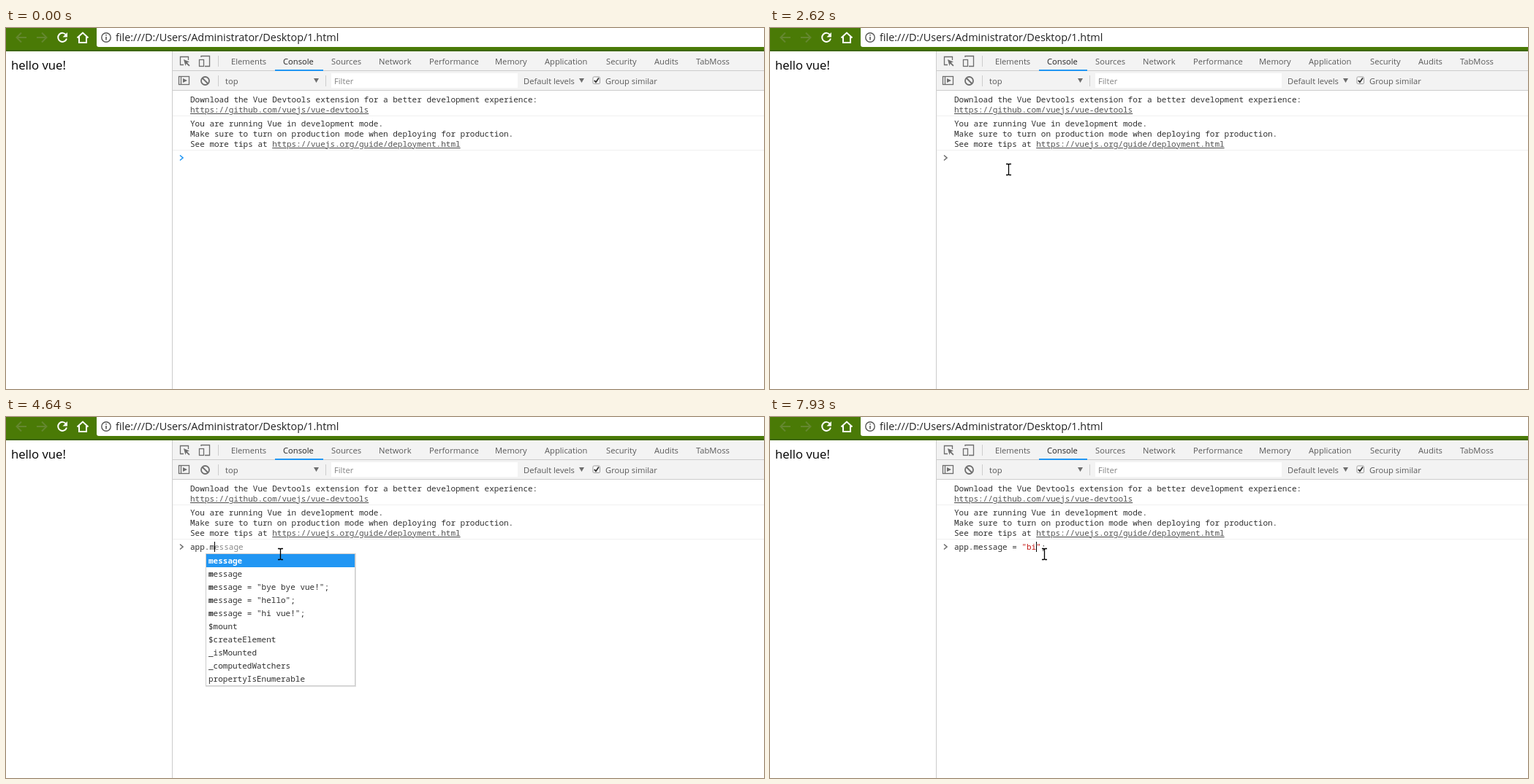
An HTML page that plays this animation: 1037 px wide and 495 px high, repeating every 8000 ms.

```html
<!DOCTYPE html>
<html lang="zh-CN">
<head>
<meta charset="utf-8">
<title>Console demo</title>
<style>
  html, body { margin: 0; width: 100%; height: 100%; overflow: hidden; background: #fff; }
  svg { display: block; }
  text { white-space: pre; }
  .ui { font: 11.2px "Open Sans", "Noto Sans", sans-serif; fill: #5a5a5a; }
  .mono { font: 11px "Noto Sans Mono", "DejaVu Sans Mono", monospace; fill: #303030; }
  .zh { font: 12px "Noto Sans CJK SC", "Noto Sans CJK", "Noto Sans", sans-serif; fill: #000; }
  .link { fill: #545454; text-decoration: underline; }
  .str { fill: #c41a16; }
  .hint { fill: #888; }
  .b { font-weight: bold; }
  .line { fill: none; stroke-width: 1; }
</style>
</head>
<body>
<svg id="stage" width="1037" height="495" viewBox="0 0 1037 495">
  <rect width="1037" height="495" fill="#fff"/>

  <!-- browser bar -->
  <rect width="1037" height="32" fill="#4a7a06"/>
  <rect y="30" width="1037" height="2" fill="#3d6604"/>
  <path d="M124 0H1037V26H127Q124 26 124 23Z" fill="#fff"/>
  <g fill="none" stroke="#64872f" stroke-width="2">
    <path d="M28 13H15M21 6.500L14.500 13L21 19.500"/>
    <path d="M42 13H55M49 6.500L55.500 13L49 19.500"/>
  </g>
  <g id="reload">
    <path d="M82.200 9.500A6 6 0 1 0 83 14.500" fill="none" stroke="#fff" stroke-width="2"/>
    <path d="M84 6V12.500H77.500Z" fill="#fff"/>
  </g>
  <path id="stop" d="M72 8L82 18M82 8L72 18" stroke="#fff" stroke-width="2"/>
  <path d="M97.500 13.500L105 6.500L112.500 13.500M100 12V20H110V12" fill="none" stroke="#fff" stroke-width="2"/>
  <circle cx="137" cy="13" r="6.200" fill="none" stroke="#555" stroke-width="1.400"/>
  <path d="M137 9V10.600M137 12V16.500" stroke="#555" stroke-width="1.600"/>
  <text x="150" y="18" font-size="14.430" font-family="Open Sans, Noto Sans, sans-serif" fill="#222">file:///D:/Users/Administrator/Desktop/1.html</text>
  <text x="7" y="57" font-size="16.700" font-family="Open Sans, Noto Sans, sans-serif">hello vue!</text>

  <!-- tool panel -->
  <rect x="228" y="32" width="809" height="54" fill="#f3f3f3"/>
  <path class="line" d="M227.500 32V495M228 58.500H1037M228 85.500H1037M290.500 38V53M290.500 65V80M437.500 65V80" stroke="#ccc"/>
  <rect x="368" y="57" width="66" height="2" fill="#2196f3"/>
  <g fill="none" stroke="#6e6e6e" stroke-width="1.300">
    <path d="M243 50.500H238.500V39.500H249.500V44"/>
    <path d="M267 40V38.500H278.500V52.500H272"/>
    <rect x="264.500" y="43.500" width="6" height="9"/>
    <rect x="236.500" y="66.500" width="14" height="11"/>
    <path d="M239.500 67V77"/>
    <circle cx="272.500" cy="72.500" r="5.500" stroke-width="1.800"/>
    <path d="M268.500 68.500L276.500 76.500" stroke-width="1.800"/>
  </g>
  <path d="M243 43L251 46.500L247.800 47.600L251.500 51.300L250.300 52.500L246.600 48.800L245.500 52ZM242 69L248 72L242 75Z" fill="#6e6e6e"/>
  <g id="tabs" class="ui"></g>
  <rect x="445" y="62" width="255" height="20" fill="#fff"/>
  <g class="ui">
    <text x="300" y="77">top</text>
    <text x="449" y="77" fill-opacity=".75">Filter</text>
    <text x="708" y="77">Default levels</text>
    <text x="820" y="77">Group similar</text>
  </g>
  <path d="M421 69H428L424.500 75ZM784 69H791L787.500 75Z" fill="#6e6e6e"/>
  <rect x="803" y="67" width="9.500" height="9.500" rx="1.500" fill="#fff" stroke="#999"/>
  <path d="M804.800 71.800L807 74.300L811 68.500" fill="none" stroke="#333" stroke-width="1.800"/>

  <!-- console -->
  <g id="log" class="mono">
    <path class="line" d="M228 120.500H1037M228 167.500H1037" stroke="#f0f0f0"/>
    <text x="252" y="102">Download the Vue Devtools extension for a better development experience:</text>
    <text x="252" y="116" class="link">https://github.com/vuejs/vue-devtools</text>
    <text x="252" y="135">You are running Vue in development mode.</text>
    <text x="252" y="149">Make sure to turn on production mode when deploying for production.</text>
    <text x="252" y="163">See more tips at <tspan class="link">https://vuejs.org/guide/deployment.html</tspan></text>
  </g>
  <path id="chevron" class="line" d="M238 174.500L242 178L238 181.500" style="stroke-width:1.600"/>
  <text id="input" class="mono" x="252" y="182"></text>
  <rect id="caret" y="171" width="1" height="14" fill="#000"/>
  <g id="popup" class="mono"></g>
  <g id="menu" class="zh"></g>

  <path id="arrow" d="M.5 .5V16.500L4.200 13L6.700 18.700L9 17.700L6.500 12.200H11.700Z" fill="#fff" stroke="#000"/>
  <path id="beam" class="line" d="M-3.500 -7.500H-1L0 -6.500L1 -7.500H3.500M0 -6.500V6.500M-3.500 7.500H-1L0 6.500L1 7.500H3.500" stroke="#000" style="stroke-width:1.300"/>
</svg>
<script>
const LOOP = 8000, CHAR = 6.6, TEXT_X = 252, ROW = 18;
const $ = id => document.getElementById(id);
const esc = s => s.replace(/&/g, '&amp;').replace(/</g, '&lt;');
const show = (id, on) => $(id).style.display = on ? '' : 'none';
const place = (id, x, y) => $(id).setAttribute('transform', `translate(${x} ${y})`);
const rect = (x, y, w, h, fill, more = '') =>
  `<rect x="${x}" y="${y}" width="${w}" height="${h}" fill="${fill}" ${more}/>`;
const label = (x, y, s, more = '') => `<text x="${x}" y="${y}" ${more}>${s}</text>`;

const tabs = { Elements: 308, Console: 379, Sources: 445, Network: 510, Performance: 579,
  Memory: 669, Application: 737, Security: 821, Audits: 887, TabMoss: 944 };
$('tabs').innerHTML = Object.entries(tabs).map(([name, x]) =>
  label(x, 50, name, name === 'Console' ? 'style="fill:#222"' : '')).join('');

// Context menu: [centre y, title, shortcut, disabled]
const menuRows = [
  [157, '返回(B)', 'Alt+向左箭头', true], [180, '前进(F)', 'Alt+向右箭头', true],
  [203, '重新加载(R)', 'Ctrl+R'], [237, '另存为(A)...', 'Ctrl+S'], [260, '打印(P)...', 'Ctrl+P'],
  [283, '投射(C)...', ''], [306, '翻成中文（简体）(T)', ''], [340, '保存网页', ''],
  [363, 'TabMoss', ''], [397, '查看网页源代码(V)', 'Ctrl+U'], [420, '检查(N)', 'Ctrl+Shift+I']];
$('menu').innerHTML =
  rect(145, 146, 267, 290, '#000', 'opacity=".18"') + rect(144, 145, 267, 290, '#000', 'opacity=".28"') +
  rect(141.5, 142.5, 267, 291, '#fff', 'stroke="#bababa"') +
  rect(142, 192, 266, 23, '#e9e9e9', 'id="hover"') +
  [219, 322, 379].map(y => rect(143, y, 265, 1, '#e6e6e6')).join('') +
  menuRows.map(([y, name, keys, off]) =>
    label(178, y + 5, name, off ? 'style="fill:#9b9b9b"' : '') +
    label(382.5, y + 4.5, keys, `text-anchor="end" letter-spacing=".4" style="fill:${off ? '#9b9b9b' : '#777'}"`)).join('') +
  rect(152, 332, 16, 16, '#3b8ee8', 'rx="3"') +
  '<circle cx="160" cy="363" r="8" fill="#b3220f"/><path d="M396 359.500L400.500 363.500L396 367.500Z" fill="#555"/>';

// Completion lists
const past = ['"bye bye vue!";', '"hello";', '"hi vue!";'];
const pastFrom = lead => past.map(s => lead + s);
const appNames = ['app', 'applicationCache', 'ApplicationCache', 'ApplicationCacheErrorEvent',
  'app.message', ...pastFrom('app.message = ')];
const messages = ['message', 'message', ...pastFrom('message = ')];
const lists = {
  a: { x: 248, w: 265, bar: true, sel: 'Window', query: 'a', rows: ['alert', 'app', 'applicationCache', 'atob',
    'AbortController', 'AbortSignal', 'AbsoluteOrientationSensor', 'Accelerometer', 'AnalyserNode',
    'AnimationEvent', 'ApplicationCache', 'ApplicationCacheErrorEvent', 'Array', 'ArrayBuffer',
    'Atomics', 'Attr', 'Audio'] },
  ap: { x: 248, w: 217, bar: true, sel: 'Window', query: 'ap', rows: [...appNames, 'captureEvents', 'escape',
    'unescape', 'DOMStringMap', 'ImageCapture', 'Map', 'MimeTypeArray', 'NamedNodeMap', 'WeakMap'] },
  app: { x: 248, w: 215, sel: 'Window', query: 'app', rows: appNames },
  dot: { x: 274, w: 189, bar: true, sel: ' ', query: '', rows: [...messages, '$attrs', '$children',
    '$createElement', '$el', '$listeners', '$options', '$parent', '$refs', '$root', '$scopedSlots',
    '$slots', '$vnode'] },
  m: { x: 274, w: 203, sel: ' ', query: 'm', rows: [...messages, '$mount', '$createElement', '_isMounted',
    '_computedWatchers', 'propertyIsEnumerable'] },
  me: { x: 274, w: 203, above: true, sel: ' ', query: 'me', rows: [...messages, '$createElement'] },
  set: { x: 327, w: 139, above: true, query: '', rows: pastFrom('= ') },
  val: { x: 340, w: 124, above: true, query: '', rows: past },
  quote: { x: 340, w: 124, above: true, query: '"', rows: past }
};

function popupHtml({ x, w, bar, above, sel, query, rows }) {
  const h = rows.length * ROW, top = above ? 168 - h : 188, inner = bar ? w - 17 : w;
  let out = rect(x - 1, top - 1, w + 3, h + 3, '#000', 'opacity=".12"') +
    rect(x - .5, top - .5, w + 1, h + 1, '#fff', 'stroke="#ccc"');
  if (sel) out += rect(x, top, inner, ROW, '#2196f3');
  rows.forEach((s, i) => {
    const y = top + i * ROW + 13;
    const n = s.toLowerCase().startsWith(query) ? query.length : 0;
    if (sel && !i) {
      out += label(x + 3, y, esc(s), 'class="b" fill="#fff" style="fill:#fff"') +
        label(x + inner - 4, y, sel, 'class="b" text-anchor="end" style="fill:#fff"');
    } else {
      out += label(x + 3, y, `<tspan class="b">${esc(s.slice(0, n))}</tspan>${esc(s.slice(n))}`);
    }
  });
  if (bar) out += rect(x + w - 16, top, 16, h, '#f1f1f1') + rect(x + w - 15, 205, 13, 17, '#c1c1c1') +
    `<path d="M${x + w - 12} 199L${x + w - 8.5} 195L${x + w - 5} 199Z" fill="#a3a3a3"/>`;
  return out;
}

// Prompt edits: [time, typed, caret column or -1, hint, list]
const M = 'app.message';
const edits = [
  [0, '', -1], [2770, '', 0], [3320, '', -1], [3570, 'a', 1], [3650, 'a', 1, 'lert', 'a'],
  [3800, 'ap', 2, 'p', 'ap'], [3950, 'app', 3, '', 'app'], [4200, 'app', 3],
  [4420, 'app.', 4, 'message', 'dot'], [4640, 'app.m', 5, 'essage', 'm'], [4890, 'app.me', 6, 'ssage', 'me'],
  [5190, M, 11], [5740, M, -1], [5820, M + ' ', 12, '', 'set'], [6070, M + ' =', 13],
  [6140, M + ' = ', 14, '', 'val'], [6440, M + ' = ""', 15, '', 'quote'], [6590, M + ' = ""', 16],
  [7060, M + ' = "";', 17], [7380, M + ' = "";', 16], [7460, M + ' = "";', 15],
  [7830, M + ' = "b";', 16], [7930, M + ' = "bi";', 17]];

// Pointer moves in held steps: [start, end, steps, from, to]
const moves = [
  [70, 610, 8, [881, 473], [144, 144], true],
  [1080, 1470, 6, [144, 144], [215, 211]],
  [2010, 2160, 3, [215, 211], [238, 204]],
  [2480, 2770, 5, [238, 204], [375, 188]]];

function pointer(t) {
  const move = moves.filter(m => t >= m[0]).pop();
  if (!move) return null;
  const [start, end, steps, from, to, entering] = move;
  const gap = (end - start) / (steps - 1);
  const k = Math.min(steps - 1, Math.floor((t - start) / gap + 1e-6));
  const p = entering ? k / (steps - 1) : (k + 1) / steps;
  const e = p * (2 - p);
  return from.map((v, i) => Math.round(v + (to[i] - v) * e));
}

let lastEdit;
function drawPrompt(t) {
  const edit = edits.filter(e => t >= e[0]).pop();
  if (edit === lastEdit) return;
  lastEdit = edit;
  const [, typed, col, hint = '', list] = edit;
  $('input').innerHTML = esc(typed).replace(/"[^"]*"/, '<tspan class="str">$&</tspan>') +
    `<tspan class="hint">${hint}</tspan>`;
  show('caret', col >= 0);
  $('caret').setAttribute('x', Math.round(TEXT_X + CHAR * col));
  $('popup').innerHTML = list ? popupHtml(lists[list]) : '';
}

function draw(t) {
  drawPrompt(t);

  const loading = t >= 1940 && t < 2160, cleared = t >= 2010 && t < 2090;
  show('reload', !loading);
  show('stop', loading);
  show('log', !cleared);
  place('chevron', 0, cleared ? -81 : 0);
  $('chevron').setAttribute('stroke', t < 760 ? '#2196f3' : '#6e6e6e');

  const pos = pointer(t);
  show('menu', t >= 760 && t < 1940);
  $('menu').setAttribute('opacity', t < 840 ? .6 : 1);
  show('hover', pos && pos[1] >= 192 && t >= 1080);

  const typing = pos && t >= 2480 && pos[0] > TEXT_X;
  show('arrow', pos && !typing);
  show('beam', typing);
  if (pos) place(typing ? 'beam' : 'arrow', pos[0] + (typing ? .5 : 0), pos[1]);
}

const began = performance.now();
function tick() {
  draw((performance.now() - began) % LOOP);
  requestAnimationFrame(tick);
}
tick();
</script>
</body>
</html>
```
